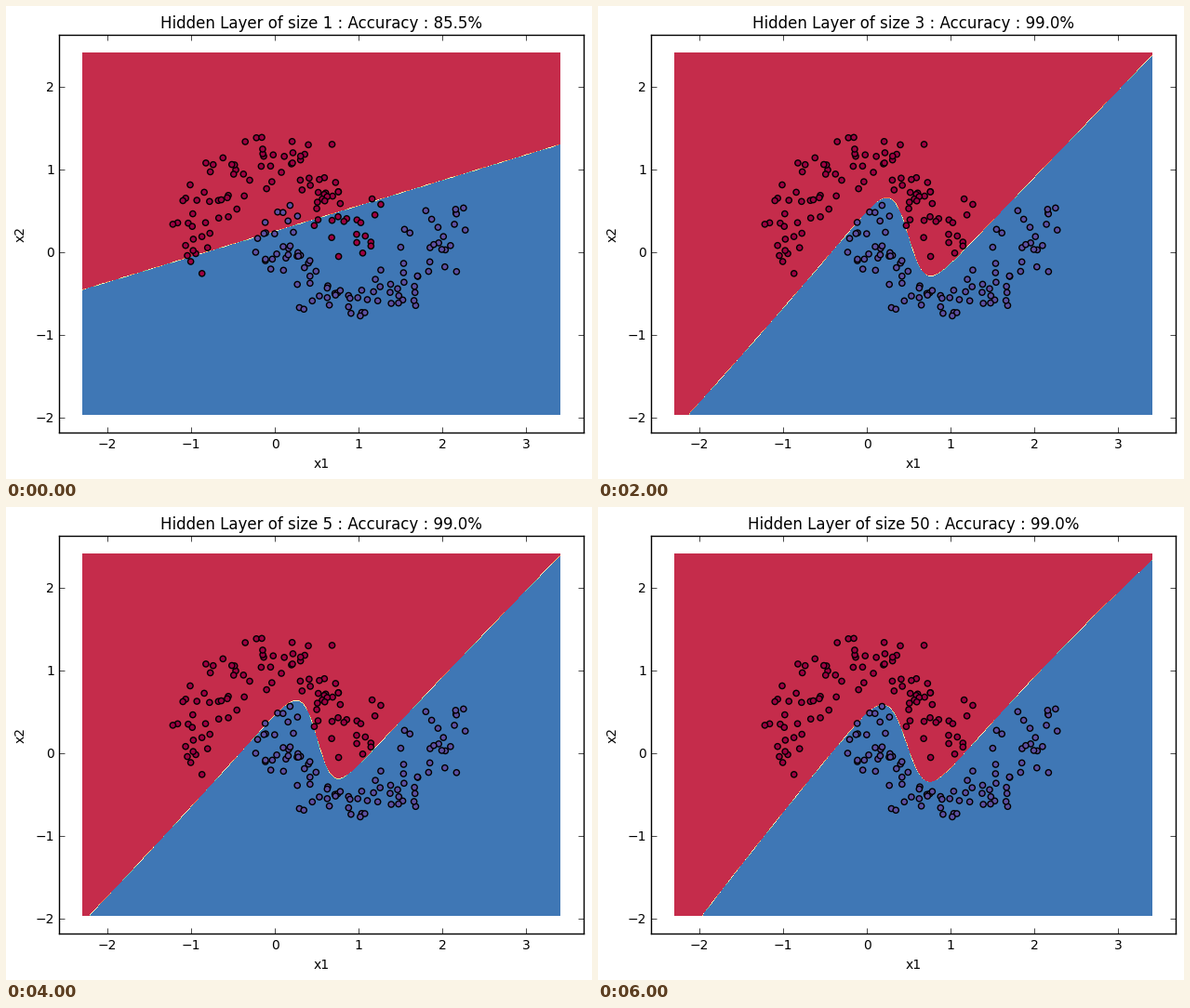
These frames come from a looping animation (630 by 509 pixels, 7 s). A matplotlib script:

```python
import numpy as np
import matplotlib.pyplot as plt
from matplotlib.animation import FuncAnimation

W, H, DPI = 630, 509, 100
LEFT, RIGHT, TOP, BOTTOM = 57.4, 621.4, 31.4, 459.4   # axes box, stage pixels
X0, Y0, SX, SY = 289, 264.7, 90, 89                   # data origin and scale

plt.rcParams.update({"font.family": "DejaVu Sans", "font.size": 10})


def curve(a, b, c=0, d=0):
    """Cubic polynomial in x."""
    return lambda x: a + b * x + c * x**2 + d * x**3


def bend(left, right, center, steep):
    """Slide from the left curve to the right one along a sigmoid."""
    def f(x):
        s = 1 / (1 + np.exp(-steep * (x - center)))
        return (1 - s) * curve(*left)(x) + s * curve(*right)(x - 1)
    return f


# Layer size, accuracy, decision boundary
MODELS = [
    (1, 85.5, curve(.244, .308)),
    (2, 86.0, curve(.385, .375, 0, .0015)),
    (3, 99.0, bend((.49, 1.20, .02), (-.16, 1.05), .49, 10)),
    (4, 99.0, bend((.50, 1.21, .02), (-.16, 1.05), .485, 9.5)),
    (5, 99.0, bend((.455, 1.13, .015), (-.165, 1.08, -.01), .503, 10.6)),
    (20, 99.0, bend((.515, 1.20, -.028), (-.195, 1.10, -.006), .465, 8.8)),
    (50, 99.0, bend((.50, 1.20, -.03), (-.21, 1.16, -.045), .47, 8.8)),
]


def moon(rng, upper, split, n=100, noise=.2):
    """Noisy half circle whose points stay on their own side of the split."""
    points = []
    for t in np.linspace(0, np.pi, n):
        x, y = np.cos(t), np.sin(t)
        base = (x, y) if upper else (1 - x, .5 - y)
        while True:
            px, py = rng.normal(base, noise)
            inside = -1.3 <= px <= 2.4 and -.97 <= py <= 1.42
            if inside and (py > split(px)) == upper:
                points.append((px, py))
                break
    return points


fig = plt.figure(figsize=(W / DPI, H / DPI), dpi=DPI, facecolor="white")
ax = fig.add_axes([LEFT / W, 1 - BOTTOM / H,
                   (RIGHT - LEFT) / W, (BOTTOM - TOP) / H])

# Predicted class on a fine grid, one filled contour per model
gx, gy = np.linspace(-2.3, 3.41, 572), np.linspace(-1.962, 2.412, 438)
levels = np.arange(8) * .15
fills = []
for _, _, split in MODELS:
    label = (gy[:, None] < split(gx)).astype(float)
    fills.append(ax.contourf(gx, gy, label, levels=levels, cmap="Spectral"))

rng = np.random.RandomState(0)
split = MODELS[5][2]
points = np.array(moon(rng, True, split) + moon(rng, False, split))
colors = np.repeat(["#9e0142", "#5e4fa2"], 100)
order = rng.permutation(len(points))
ax.scatter(*points[order].T, s=20, c=colors[order], edgecolors="black",
           linewidths=1, zorder=2)

ax.set_xlim((LEFT - X0) / SX, (RIGHT - X0) / SX)
ax.set_ylim((Y0 - BOTTOM) / SY, (Y0 - TOP) / SY)
ax.set_xticks(range(-2, 4))
ax.set_yticks(range(-2, 3))
ax.tick_params(direction="in", length=4, width=.5, pad=4, top=True, right=True)
for spine in ax.spines.values():
    spine.set_linewidth(1)

fig.text(339 / W, 1 - 497 / H, "x1", ha="center", va="baseline")
fig.text(15.5 / W, 1 - 245 / H, "x2", rotation=90, ha="center", va="center")
title = ax.set_title("", fontsize=12, pad=5)


def update(k):
    for i, fill in enumerate(fills):
        fill.set_visible(i == k)
    size, accuracy, _ = MODELS[k]
    title.set_text(f"Hidden Layer of size {size} : Accuracy : {accuracy:.1f}%")
    return [title, *fills]


anim = FuncAnimation(fig, update, frames=len(MODELS), interval=1000,
                     repeat=True, repeat_delay=0, blit=False)
plt.show()
```
